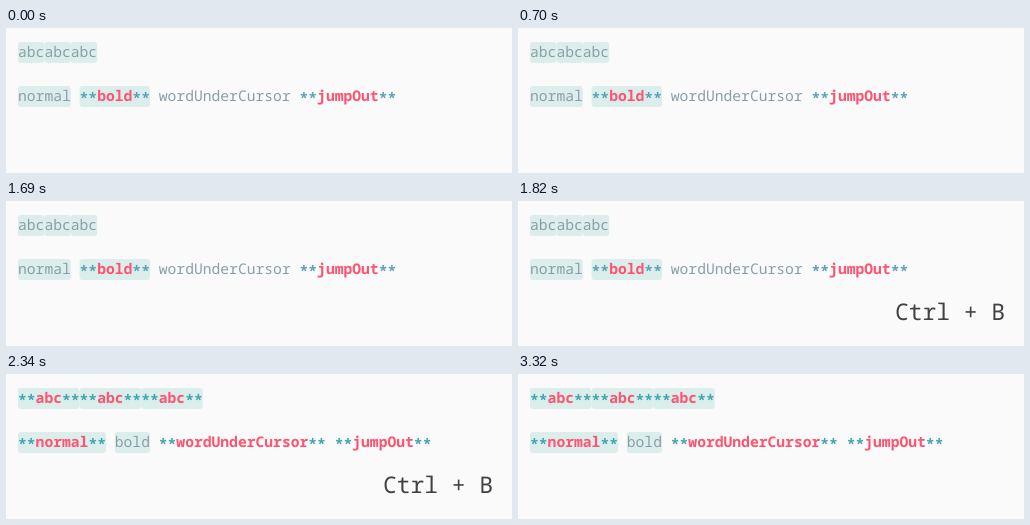
Recreate the animation shown at these times as an HTML page. Size 506x145 px, loop 3750 ms.

```html
<!DOCTYPE html>
<html lang="en">
<head>
<meta charset="utf-8">
<title>Toggle bold</title>
<style>
html, body { margin: 0; width: 100%; height: 100%; overflow: hidden; background: #fafafa; }
svg { display: block; width: 506px; height: 145px; }
text {
  font: 14.662px "Noto Sans Mono", "DejaVu Sans Mono", monospace;
  fill: #8a9fa9; white-space: pre; text-rendering: geometricPrecision;
}
.mark, .strong { font-weight: 700; }
.strong { fill: #ff5370; }
.mark { transform: translateY(1.5px); }
.before .mark { fill: #5b9fb6; }
.after .mark { fill: #3fa3af; }
.selection { fill: #dbeeec; }
.caret { fill: #1f1f1f; }
.keys { font-size: 22.9px; fill: #424242; }
</style>
</head>
<body>
<svg viewBox="0 0 506 145">
  <g class="before"></g>
  <g class="after"></g>
  <text class="keys" x="377" y="119">Ctrl + B</text>
</svg>
<script>
const LOOP = 3750, LEFT = 12, ADVANCE = 8.797;
const TOGGLE = 1870;
const CARETS_ON = [[210, 700], [1210, 1690], [1870, 2340], [2830, 3320]];
const KEYS_ON = [1820, 2750];

// Brackets enclose a selection, | is a caret.
const scenes = {
  before: ['[abc|][abc|][abc|]',
           '[normal|] [**bold**|] wordUnder|Cursor **jumpOut|**'],
  after: ['[**abc**|][**abc**|][**abc**|]',
          '[**normal**|] [bold|] **wordUnder|Cursor** **jumpOut**|']
};

const rect = (cls, x, y, width, height, rx = 0) =>
  `<rect class="${cls}" x="${x}" y="${y}" width="${width}" height="${height}" rx="${rx}"/>`;

function lineMarkup(source, top) {
  let column = 0, start = 0, strong = false;
  let selections = '', runs = '', carets = '';
  for (const token of source.match(/\*\*|[[\]|]|[^*[\]|]+/g)) {
    const x = LEFT + column * ADVANCE;
    if (token === '[') start = x;
    else if (token === ']') selections += rect('selection', start, top + 1, x - start, 21, 3);
    else if (token === '|') carets += rect('caret', Math.round(x - 1), top, 2, 22);
    else {
      const mark = token === '**';
      const cls = mark ? 'mark' : strong ? 'strong' : 'plain';
      runs += `<text class="${cls}" x="${x}" y="${top + 16}">${token}</text>`;
      if (mark) strong = !strong;
      column += token.length;
    }
  }
  return `${selections}${runs}<g class="carets">${carets}</g>`;
}

const find = selector => document.querySelector(selector);
for (const name in scenes) {
  find('.' + name).innerHTML =
    scenes[name].map((line, i) => lineMarkup(line, 13 + i * 44)).join('');
}

const before = find('.before'), after = find('.after'), keys = find('.keys');
const caretGroups = document.querySelectorAll('.carets');
const show = (element, on) => { element.style.display = on ? '' : 'none'; };
const within = (t, [from, to]) => t >= from && t < to;

function draw(now) {
  const t = now % LOOP;
  show(before, t < TOGGLE);
  show(after, t >= TOGGLE);
  show(keys, within(t, KEYS_ON));
  const lit = CARETS_ON.some(span => within(t, span));
  caretGroups.forEach(group => show(group, lit));
}

const began = performance.now();
function tick() {
  draw(performance.now() - began);
  requestAnimationFrame(tick);
}
tick();
</script>
</body>
</html>
```
